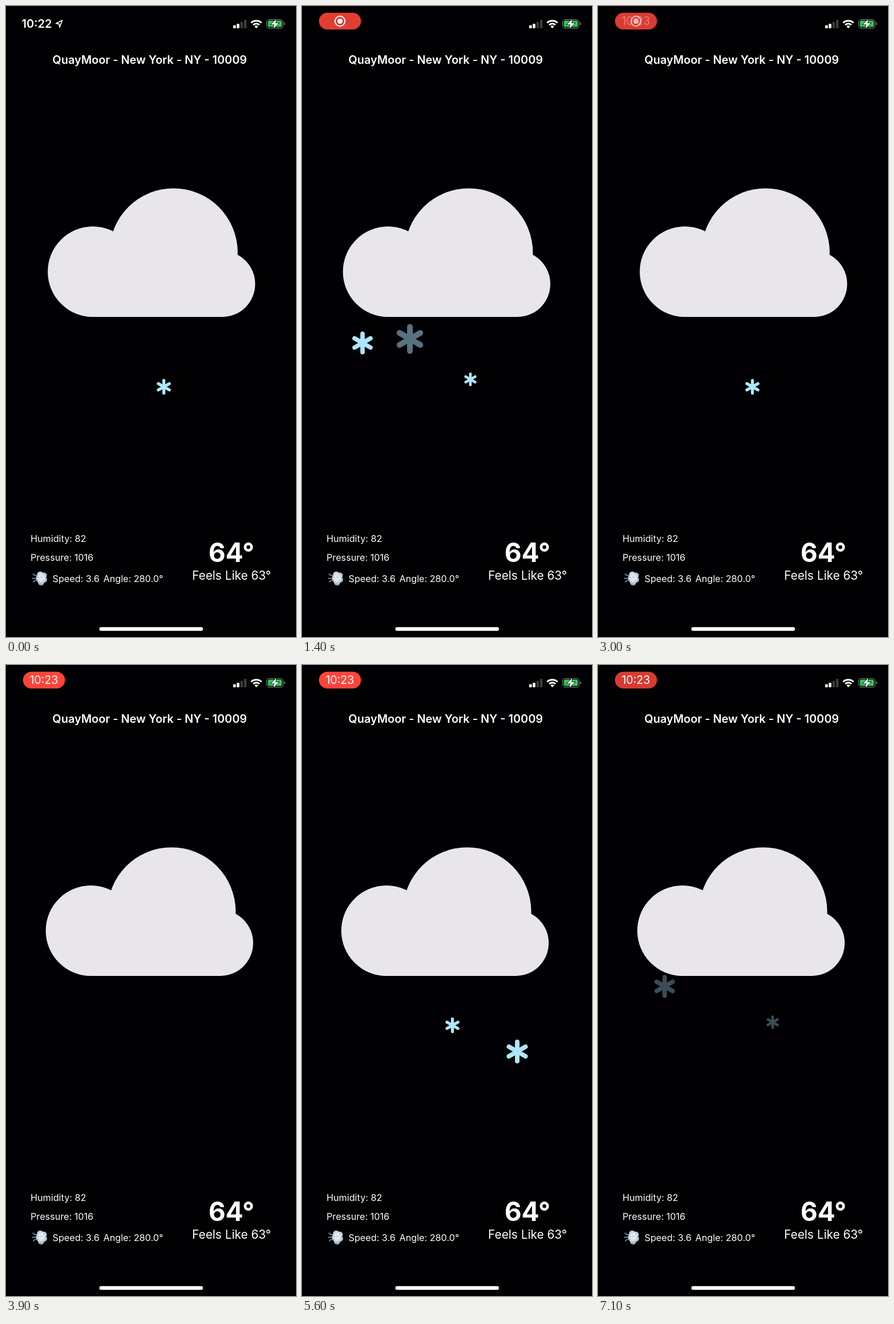
Animation, 508 px wide and 1102 px high, one loop 7.2 s. Source, as an HTML page:

```html
<!DOCTYPE html>
<html lang="en">
<head>
<meta charset="utf-8">
<title>Snowy weather</title>
<style>
  html, body { margin: 0; width: 100%; height: 100%; overflow: hidden; background: #000002; }
  svg { display: block; width: 100vw; height: 100vh; }
  text { font-family: Inter, "Open Sans", sans-serif; fill: #fff; }
  .info { font-size: 16.2px; }
  .title { font-size: 19.9px; font-weight: 600; text-anchor: end; }
  .mid { text-anchor: middle; }
</style>
</head>
<body>
<svg viewBox="0 0 508 1102" preserveAspectRatio="none">
  <defs>
    <radialGradient id="puff" gradientUnits="userSpaceOnUse" cx="61" cy="998" r="15">
      <stop offset="0" stop-color="#f4f8fc"/>
      <stop offset=".5" stop-color="#cfdbe6"/>
      <stop offset="1" stop-color="#8095aa"/>
    </radialGradient>
    <path id="flake" d="M0-21V21M-18.2-10.5L18.2 10.5M-18.2 10.5L18.2-10.5"
      fill="none" stroke="#ade6ff" stroke-width="10" stroke-linecap="round"/>
  </defs>

  <g id="clock">
    <text x="27.5" y="38" font-size="20" font-weight="600">10:22</text>
    <path d="M98.5 25L87.5 30.4L93 31.4L94 37Z" fill="none" stroke="#fff" stroke-width="1.7" stroke-linejoin="round"/>
  </g>

  <g id="pill">
    <rect id="pillBg" x="29.7" y="11.7" width="73.6" height="29.3" rx="14.6"/>
    <g id="rec">
      <circle cx="66.5" cy="26.5" r="8.7" fill="none" stroke="#fff" stroke-width="2"/>
      <circle cx="66.5" cy="26.5" r="4.6" fill="#fff"/>
    </g>
    <text id="pillTime" class="mid" x="66.3" y="33.3" font-size="19.5">10:23</text>
  </g>

  <g fill="#fff">
    <rect x="398" y="33.5" width="4.6" height="5.5" rx="1.3"/>
    <rect x="404.2" y="31" width="4.6" height="8" rx="1.3"/>
    <rect x="410.5" y="27.8" width="4.6" height="11.2" rx="1.3" fill="#3c3c3e"/>
    <rect x="416.8" y="24.2" width="4.6" height="14.8" rx="1.3" fill="#3c3c3e"/>
  </g>
  <g fill="none" stroke="#fff" stroke-width="3">
    <path d="M429.4 29.4A13.2 13.2 0 0 1 447.6 29.4"/>
    <path d="M433 33A8 8 0 0 1 444 33"/>
    <path d="M438.5 39L435.2 35.6A4.6 4.6 0 0 1 441.8 35.6Z" fill="#fff" stroke="none"/>
  </g>
  <rect x="456.6" y="23.6" width="28.8" height="15" rx="4.6" fill="none" stroke="#77777a" stroke-width="1.2"/>
  <rect x="458.7" y="25.6" width="24.6" height="11" rx="2.8" fill="#34c759"/>
  <path d="M487 28.6Q489 29.4 489 31.1T487 33.6Z" fill="#77777a"/>
  <path d="M473.5 23L464 32.3H470L468.4 39.4L478 30H472Z" fill="#fff" stroke="#000" stroke-width="1.4" paint-order="stroke"/>

  <text class="title" x="422" y="101">QuayMoor - New York - NY - 10009</text>

  <g id="snow"></g>
  <g id="cloud" fill="#e8e6e9">
    <circle cx="151.3" cy="464" r="79"/>
    <circle cx="292.7" cy="430.7" r="112.3"/>
    <circle cx="378" cy="485.4" r="57.6"/>
    <rect x="151" y="464" width="227" height="79"/>
  </g>

  <g class="info">
    <text x="43" y="936">Humidity: 82</text>
    <text x="43" y="969">Pressure: 1016</text>
    <text x="81.5" y="1005.5">Speed: 3.6</text>
    <text x="170.5" y="1005.5">Angle: 280.0°</text>
  </g>
  <g fill="url(#puff)">
    <circle cx="60" cy="993" r="5.5"/>
    <circle cx="66.5" cy="994.5" r="5"/>
    <circle cx="67" cy="1002" r="5"/>
    <circle cx="61.5" cy="1006.5" r="5.5"/>
    <circle cx="60.5" cy="999.5" r="8"/>
  </g>
  <path d="M47 992Q51 996 55 994M46 999.5H53M48 1006Q51 1001.5 56 1003" fill="none" stroke="#8fa3b6" stroke-width="1.4" stroke-linecap="round"/>
  <path d="M55.5 997.5l1.8.5M60.5 998l2-.3" stroke="#7d90a4" stroke-width="1.2" stroke-linecap="round"/>

  <text class="mid" x="395" y="970.7" font-size="46" font-weight="700">64°</text>
  <text class="mid" x="395.2" y="1002" font-size="20.8">Feels Like 63°</text>

  <rect x="163.5" y="1084.7" width="181.5" height="6.5" rx="3.25" fill="#fff"/>
</svg>
<script>
  const LOOP = 7200, STEP = 100, FALL = 3000, FADE = 300;
  const $ = id => document.getElementById(id);
  const clamp = v => Math.max(0, Math.min(1, v));

  // xs: starting x on each successive fall; vx, vy in px per ms
  const flakes = [
    { size: 52, start: 1250, life: 1350, y: 568.8, vx: -.011, vy: .084, xs: [190, 190.7, 183.6, 186] },
    { size: 40, start: 1000, life: 1350, y: 552.2, vx: .0275, vy: .0905, xs: [92, 95, 87.5, 114] },
    { size: 41.5, start: 1480, life: 1440, y: 575, vx: .005, vy: .0893, xs: [366, 361.4, 371.4, 366] },
    { size: 27.5, start: 1850, life: 1460, y: 562.2, vx: 0, vy: .0894, xs: [276.5, 270.5, 263.5, 268] },
    { size: 24, start: 1000, life: 1010, y: 614.5, vx: 0, vy: .094, xs: [290, 295, 298, 306] }
  ];
  for (const f of flakes) {
    f.el = document.createElementNS("http://www.w3.org/2000/svg", "use");
    f.el.setAttribute("href", "#flake");
    $("snow").append(f.el);
  }

  function drawFlake(f, t) {
    const pass = Math.floor((t - f.start) / FALL);
    const age = t - f.start - pass * FALL;
    const x = f.xs[pass + 1] + f.vx * age;
    const y = f.y + f.vy * age;
    f.el.setAttribute("transform", `translate(${x} ${y}) scale(${f.size / 52})`);
    f.el.setAttribute("opacity", clamp(Math.min(age, f.life - age) / FADE));
  }

  function draw(t) {
    const sway = 3.5 * Math.sin(2 * Math.PI * t / 1500 + .24);
    $("cloud").setAttribute("transform", `translate(${sway} 0)`);
    flakes.forEach(f => drawFlake(f, t));

    const shown = clamp((t - 200) / 200);
    const time = clamp((t - 2900) / 300);
    const pulse = Math.max(0, Math.cos(2 * Math.PI * (t - 1100) / 2000));
    const dim = 1 - .15 * Math.sqrt(pulse);
    $("clock").setAttribute("opacity", 1 - shown);
    $("pill").setAttribute("opacity", shown);
    $("rec").setAttribute("opacity", 1 - time);
    $("pillTime").setAttribute("opacity", time);
    $("pillBg").setAttribute("fill", `rgb(${255 * dim} ${69 * dim} ${58 * dim})`);
  }

  const begin = performance.now();
  function tick() {
    const t = Math.max(0, performance.now() - begin) % LOOP;
    draw(Math.floor(t / STEP) * STEP);
    requestAnimationFrame(tick);
  }
  tick();
</script>
</body>
</html>
```
